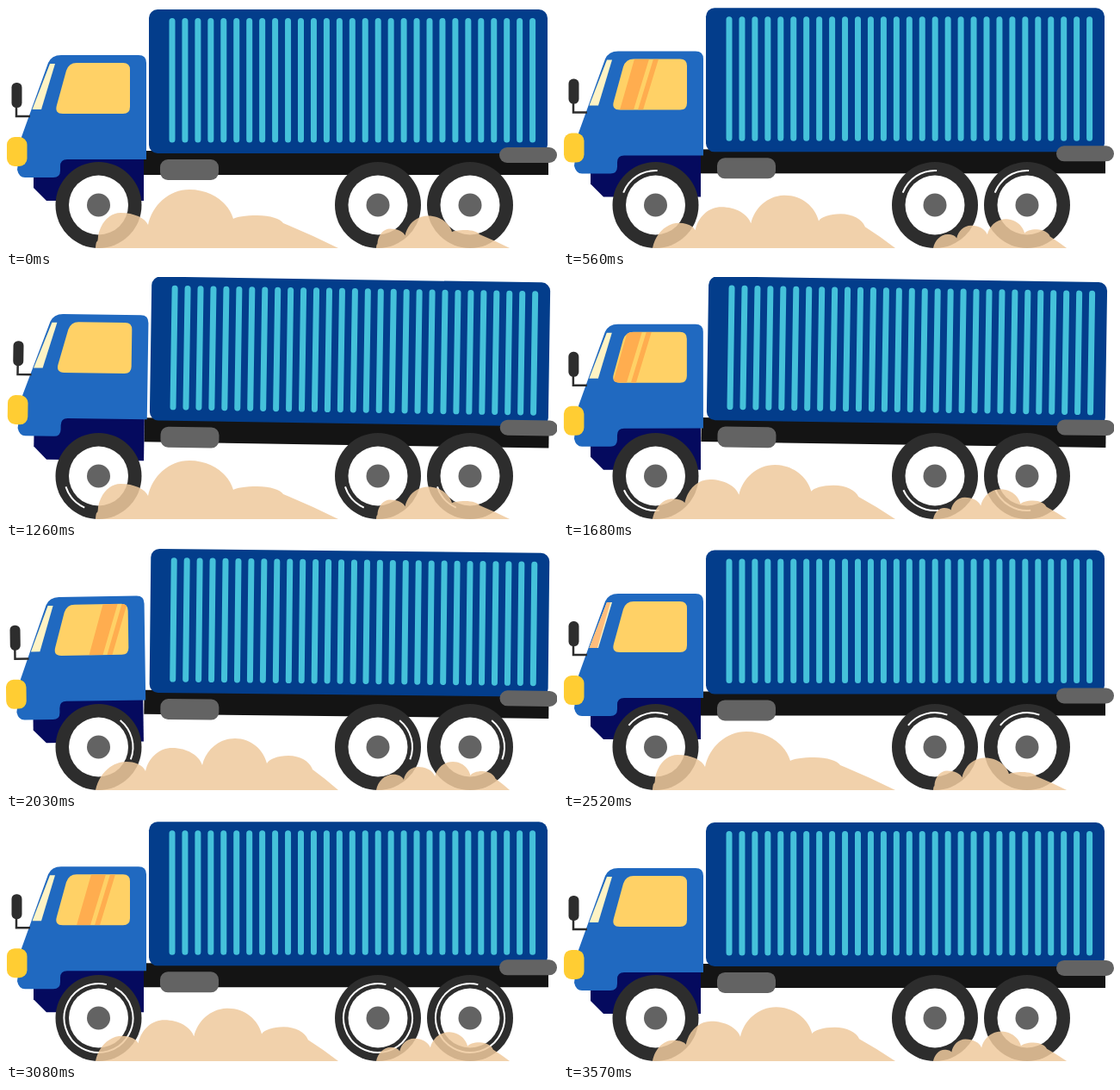
Recreate the animation shown at these times as an HTML page. Size 640 by 282 pixels, loop 3640 ms.

```html
<!DOCTYPE html>
<html lang="en">
<head>
<meta charset="utf-8">
<title>Truck</title>
<style>
  html, body { margin: 0; width: 100%; height: 100%; overflow: hidden; background: #fff; }
  svg { display: block; width: 100%; height: 100%; }
</style>
</head>
<body>
<svg viewBox="0 0 640 282">
  <defs>
    <clipPath id="paneClip"><path id="pane" d="M82 66H136Q144 66 144 74V117Q144 125 136 125H66Q56 125 59 115L70 75Q73 66 82 66Z"/></clipPath>
    <clipPath id="shieldClip"><path id="shield" d="M51 67H57L41 120H30.500Z"/></clipPath>
    <g id="wheel">
      <circle r="50" fill="#2d2d2d"/>
      <circle r="34.500" fill="#fff"/>
      <circle r="13.500" fill="#636363"/>
      <circle id="shine" r="40" fill="none" stroke="#fff" stroke-width="2" pathLength="360"/>
    </g>
    <path id="cloud"/>
  </defs>

  <g id="body">
    <rect x="160" y="168" width="470" height="28" fill="#141414"/>
    <rect x="179" y="178" width="68" height="24" rx="9" fill="#636363"/>
    <rect x="166" y="4" width="463" height="167" rx="10" fill="#033d8b"/>
    <path id="ribs" stroke="#45c1da" stroke-width="7" stroke-linecap="round"/>
    <rect x="573" y="164" width="67" height="18" rx="9" fill="#636363"/>
  </g>

  <g id="cab">
    <path d="M32 185V211L47 226H160V170H32Z" fill="#050a5e"/>
    <path d="M64 57H154Q163 57 163 66V178H71Q63 178 63 186V191Q63 199 55 199H22Q15 199 13 190L18 152L49 66Q53 57 64 57Z" fill="#2069c0"/>
    <path d="M12 115V128H28" fill="none" stroke="#2d2d2d" stroke-width="2.500"/>
    <rect x="6.500" y="89" width="12" height="29" rx="5.500" fill="#2d2d2d"/>
    <use href="#shield" fill="#fff3c4"/>
    <g clip-path="url(#shieldClip)"><path id="shieldGlint" d="M47 64H56L39 123H25Z" fill="#ffbd7c"/></g>
    <use href="#pane" fill="#ffd166"/>
    <g clip-path="url(#paneClip)"><path id="paneGlint" d="M1 66H18L0 125H-16ZM23 66H29L11 125H5Z" fill="#ffad4f"/></g>
    <rect x="1" y="152" width="23.500" height="34" rx="9" fill="#ffcd33"/>
  </g>

  <use href="#wheel" x="107.500" y="231"/>
  <use href="#wheel" x="432" y="231"/>
  <use href="#wheel" x="539" y="231"/>
  <g fill="#efc99d" fill-opacity=".85">
    <use href="#cloud" transform="translate(104 281)"/>
    <use href="#cloud" transform="translate(430 281) scale(.55)"/>
  </g>
</svg>
<script>
const FRAME = 70, FRAMES = 52, GLINT = 17, DUST = 18;
const { sin, cos, PI, min, max, abs, sqrt } = Math;
const $ = id => document.getElementById(id);
const lerp = (a, b, k) => a + (b - a) * k;
const move = (id, transform) => $(id).setAttribute('transform', transform);

// Each hump: peak x, height, then right valley x, height; at rest and pushed right.
const resting = [[2, 8, 3, 14], [29, 41, 61, 27], [109, 68, 160, 34], [188, 38, 218, 29]];
const pushed = [[36, 33, 58, 22], [89, 49, 124, 29], [162, 60, 199, 31], [224, 40, 252, 24]];

function cloudPath(push) {
  let d = 'M0 0', x0 = 0, y0 = 0;
  resting.forEach((hump, i) => {
    const [px, h, x1, h1] = hump.map((v, n) => lerp(v, pushed[i][n], push));
    const y1 = -h1;
    d += `C${lerp(x0, px, .1)} ${lerp(y0, -h, .55)} ${lerp(x0, px, .5)} ${-h} ${px} ${-h}`;
    d += `C${lerp(x1, px, .5)} ${-h} ${lerp(x1, px, .1)} ${lerp(y1, -h, .55)} ${x1} ${y1}`;
    [x0, y0] = [x1, y1];
  });
  return d + `Q${lerp(x0, 282, .5)} ${y0 * .55} 282 0Z`;
}

function drawTruck(f) {
  const shake = (1 - cos(2 * PI * f / 5.65)) / 2;
  const jolt = min(1, max(0, (f - 8) / 25));
  const tilt = .9 * sqrt(max(0, sin(PI * jolt)));
  const swing = sin(2 * PI * jolt ** 1.5);
  const lift = 4.7 * shake + 12 * max(0, swing);
  move('body', `translate(0 ${-1.8 * shake}) rotate(${tilt} 430 220)`);
  move('cab', `translate(0 ${-lift}) rotate(${.85 * swing} 110 230)`);
}

function drawGlints(p) {
  const length = 72 * min(1, p / 1.5) + 273 * max(0, 1 - abs(p - 10) / 2);
  $('shine').setAttribute('stroke-dasharray', `${length} 360`);
  $('shine').setAttribute('visibility', p ? 'visible' : 'hidden');
  move('shine', `rotate(${21 + 117 * p - length / 2})`);
  move('shieldGlint', `translate(${14 * (p - 2)} 0)`);
  move('paneGlint', `translate(${18 + 8 * p} 0)`);
  $('paneGlint').setAttribute('visibility', p > 3 ? 'visible' : 'hidden');
}

function draw(now) {
  const f = Math.floor(now / FRAME) % FRAMES;
  drawTruck(f);
  drawGlints(f % GLINT);
  $('cloud').setAttribute('d', cloudPath(sin(PI * (f % DUST / DUST) ** 1.4)));
}

$('ribs').setAttribute('d', Array.from({ length: 29 }, (_, i) => `M${193 + i * 14.95} 17.500V155`).join(''));

let start;
function tick(now) {
  start ??= now;
  draw(now - start);
  requestAnimationFrame(tick);
}
draw(0);
requestAnimationFrame(tick);
</script>
</body>
</html>
```
